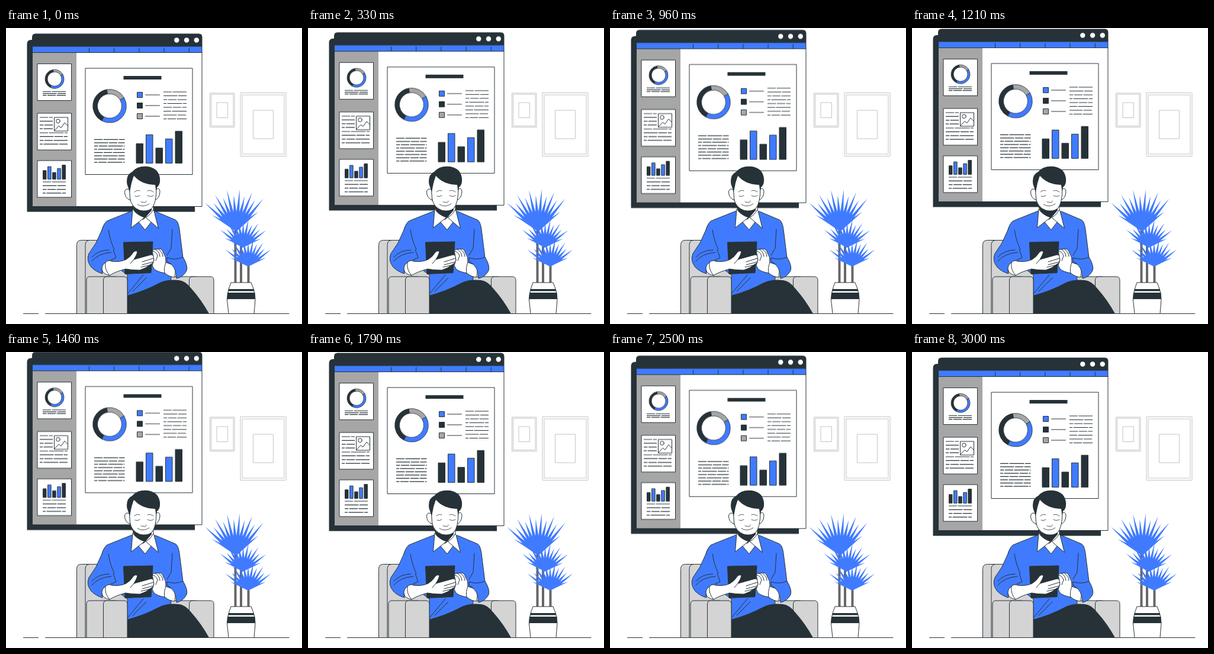
An HTML page for the animation above (3.04 s loop, 500 by 500 pixels).

```html
<!DOCTYPE html>
<html lang="en">
<head>
<meta charset="utf-8">
<title>Report review</title>
<style>
  html, body { margin: 0; width: 100%; height: 100%; overflow: hidden; background: #fff; }
  svg { display: block; width: 100%; height: 100%; }
  .ln { fill: none; stroke: #263238; stroke-linecap: round; stroke-linejoin: round; }
  .row { stroke-linecap: butt; stroke-width: 1.2; }
  .thin { stroke-width: .8; }
  .o { stroke: #263238; stroke-linejoin: round; }
  .w { fill: #fff; }
  .b { fill: #407bff; }
  .d { fill: #263238; }
  .g { fill: #a6a6a6; }
  .c { fill: #d4d4d4; }
  .s { fill: #666; }
  .f { fill: none; stroke: #c4c4c4; }
  /* 3 s up and down, then a short rest until the loop ends */
  #window { animation: float 3040ms linear infinite; }
  @keyframes float {
    0%, 98.68%, 100% { transform: translateY(0); }
    49.34% { transform: translateY(-10px); }
  }
</style>
</head>
<body>
<svg viewBox="0 0 500 500">
  <g id="pictures"></g>
  <g id="window"></g>
  <path class="ln" d="M29.5 482.5H54.5M66.5 482.5H478"/>
  <g id="plant"></g>
  <g id="chairBack"></g>

  <g id="torso">
    <path class="b o" d="M213 309L174 324.5Q166 328 162 341L181 400L205 417V455L278 440L280 400L299 388L293 340Q291 326 286 324L253 310Z"/>
    <path class="b o" d="M172 325Q166 328 162 341L152 363L140 381Q135 393 144 404Q152 412 163 415Q160 403 168 396L186 388L181 374"/>
    <path class="ln" d="M173 341Q176 360 183 374M281 340L279 372L272 384M145 387Q156 375 174 375M145 394Q155 381 178 379M206 448L232 417M214 445L237 422"/>
  </g>

  <path class="d" d="M204 482.5V452Q234 444 258 431Q272 424 292 426Q303 427 313 440Q330 459 343 482.5Z"/>
  <g id="chairArm"></g>

  <g id="head">
    <path class="w o" d="M215 296V309L224 328L235 341L245 328L249 309V290Z"/>
    <path class="d" d="M213 300L220 317Q228 325 233 323L246 308V300Z"/>
    <path class="w o" d="M214 306L211.500 337.500L234 320Q221 316 214 306Z"/>
    <path class="w o" d="M248.500 307Q244 316 236 320L257.500 338.500L250 309Z"/>
    <path class="w o" d="M209 274Q203 269 200.500 276Q200 287 210 291ZM253 273Q259 268 260 276Q260 287 251.500 291Z"/>
    <path class="w o" d="M208 264L209.500 288Q212 303 226 308Q238 311 246 305Q254 296 254 270L250 250H212Z"/>
    <path class="d" d="M209 277L204.500 264Q202 248 213 243Q222 232 240 234Q258 237 260 254Q261 265 255 269L253.500 276L252 265Q227 264 216 249L212 262Z"/>
    <path class="ln thin" d="M217 277Q221 273 226 275M239 275Q244 273 249 277M218 284Q222 286 226 283M239 283Q244 286 249 283M228 293Q229 296 232 294Q236 297 237 292M222 298Q232 304 242 297"/>
  </g>

  <g id="hands">
    <path class="d o" d="M198.500 362L248 361L245 413.500L201 415.500Z"/>
    <path class="w o" d="M168 396Q173 391 178 394Q192 396 203 391Q211 386 215 379Q219 375 222 378Q221 383 216 391L245 383Q250 383 250 390L249 396L236 405L226 409Q212 409 202 407Q184 412 175 418Q163 416 162 407Q162 400 168 396Z"/>
    <path class="ln" d="M168 396Q166 408 175 418M216 391L210 398M249 389L230 395M249 395L230 400M245 400L228 404"/>
    <path class="w o" d="M270 396L287 402L285 421Q277 421 268 414Q256 412 250 407L247 401L250 392L248 381Q246 375 250 374L259 373Q264 373 266 380Q271 387 270 396Z"/>
    <path class="b o" d="M272 388Q286 393 299 387Q308 402 305 410Q299 421 288 423Q288 402 272 394Z"/>
    <path class="ln" d="M248 377Q254 378 256 385L253 393M252 374Q259 377 260 386M258 374Q265 379 265 386M270 396Q266 406 268 414"/>
  </g>
</svg>
<script>
  const BLUE = '#407bff', DARK = '#263238', GREY = '#a6a6a6';
  const FLOOR = 482.5;

  const put = (id, ...parts) => document.getElementById(id).innerHTML = parts.flat().join('');
  const path = (cls, d, extra = '') => `<path class="${cls}" d="${d}" ${extra}/>`;
  const rect = (cls, x, y, w, h) => path(cls, `M${x} ${y}h${w}v${h}h${-w}Z`);
  const repeat = (n, draw) => Array.from({ length: n }, (_, i) => draw(i));
  const polar = (x, y, r, deg) => {
    const a = deg * Math.PI / 180;
    return `${x + r * Math.cos(a)} ${y + r * Math.sin(a)}`;
  };

  // Block with two round upper corners.
  const slab = (cls, x1, x2, top, bottom, r) =>
    path(cls, `M${x1} ${bottom}V${top + r}q0 ${-r} ${r} ${-r}H${x2 - r}q${r} 0 ${r} ${r}V${bottom}Z`);

  const donut = (x, y, R, r) =>
    [[-100, -30, GREY], [-30, 118, BLUE], [118, 260, DARK]].map(([a, b, fill]) =>
      path('o thin', `M${polar(x, y, R, a)}A${R} ${R} 0 0 1 ${polar(x, y, R, b)}` +
        `L${polar(x, y, r, b)}A${r} ${r} 0 0 0 ${polar(x, y, r, a)}Z`, `style="fill:${fill}"`));

  const bars = (x, base, step, width, scale) =>
    [33, 48, 25.5, 41, 54].map((h, i) =>
      rect(i % 2 ? 'b o' : 'd o', x + i * step, base - h * scale, width, h * scale));

  // Placeholder text: each row starts elsewhere in the dash pattern.
  const rows = (x1, x2, y, step, n) => repeat(n, i =>
    path('ln row', `M${x1} ${y + i * step}H${x2}`,
      `stroke-dasharray="14 1.500 25 1.500" stroke-dashoffset="${i * 17}"`));

  const picture = (x, y, w, h, insets) => insets.map(([dx, dy]) =>
    rect('f', x + dx, y + dy, w - 2 * dx, h - 2 * dy));

  // Spikes fan out from the base, long and short in turn, shorter at the rim.
  function tuft(x, y, length, from, to, n) {
    const step = (to - from) / (n - 1);
    let d = `M${x} ${y}`;
    for (let i = 0; i < n; i++) {
      const rim = i === 0 || i === n - 1;
      const size = rim ? .7 : i % 2 ? 1 : .86;
      const a = from + i * step;
      d += `L${polar(x, y, length * size, a)}`;
      if (i < n - 1) d += `L${polar(x, y, length * .47, a + step / 2)}`;
    }
    return path('b', d + 'Z');
  }

  put('pictures',
    picture(344.5, 110, 41.5, 57.5, [[0, 0], [2, 2], [11.5, 16]]),
    picture(396, 109.5, 77, 107, [[0, 0], [3, 3.5], [21.5, 29.5]]));

  put('window',
    slab('d', 35.5, 319, 20, 310.5, 7),
    rect('w o', 44.5, 41, 286.5, 260.5),
    rect('g', 45, 41, 74, 260),
    slab('d', 44, 331.5, 9.5, 31, 6),
    rect('b o', 44.5, 31, 286.5, 10.5),
    repeat(5, i => path('ln', `M${140.5 + i * 42.2} 34v7`)),
    repeat(3, i => `<circle class="w" cx="${288.3 + i * 16.75}" cy="20.5" r="4.2"/>`),
    rect('w o', 134, 68, 181, 179.5),
    [60.5, 144, 224].map(y => rect('w o', 53, y, 57.5, 62)),
    rect('d', 198.5, 81, 64, 6),
    ['b', 'd', 'g'].map((fill, i) =>
      rect(fill + ' o', 221.5, 108.5 + i * 18, 9, 9) + path('ln', `M235.5 ${113 + i * 18}h24`)),
    donut(175, 131.8, 28.3, 20.5), donut(82, 86.2, 16, 12),
    bars(220, 228.3, 16.5, 11.5, 1), bars(62.5, 255.3, 8.1, 5.5, .44),
    rows(266, 305, 108, 6.5, 8), rows(149, 200.500, 188.3, 5.5, 8),
    rows(62, 101, 107.5, 3.1, 3), rows(57, 79, 151, 6.4, 4),
    rows(57, 104, 177, 6.4, 4), rows(62, 101, 260, 6.3, 4),
    rect('w o', 81.5, 151, 23, 23),
    '<circle class="ln" cx="88" cy="157.3" r="3.3"/>',
    path('ln', 'M82 173l7-7.500l4 3l6-8.500l5 5'));

  put('plant',
    [[385.5, 335], [395, 365], [407.5, 396]].map(([x, y]) => rect('s', x, y, 4, 432 - y)),
    tuft(389, 344, 72, -146, -42, 13),
    tuft(400, 371, 49, -152, -26, 13),
    tuft(409, 403, 48, -154, -26, 13),
    path('w o', `M380 430H414Q421 446 421 459L419 ${FLOOR}H376L373.5 459Q373.5 446 380 430Z`),
    path('d', 'M376 441H418.5L419.5 444.5H375ZM374 447H420.5L421 458H373.5Z'));

  put('chairBack',
    slab('c o', 119.5, 210, 358.5, FLOOR, 8),
    slab('c o', 134, 210, 358.5, FLOOR, 8),
    slab('c o', 272, 326, 420, FLOOR, 6),
    slab('c o', 309.5, 351, 420, FLOOR, 6));

  put('chairArm',
    slab('c o', 136, 190, 420, FLOOR, 6),
    slab('c o', 164.5, 205, 420, FLOOR, 6),
    path('ln', `M119.5 ${FLOOR}H351`));
</script>
</body>
</html>
```
